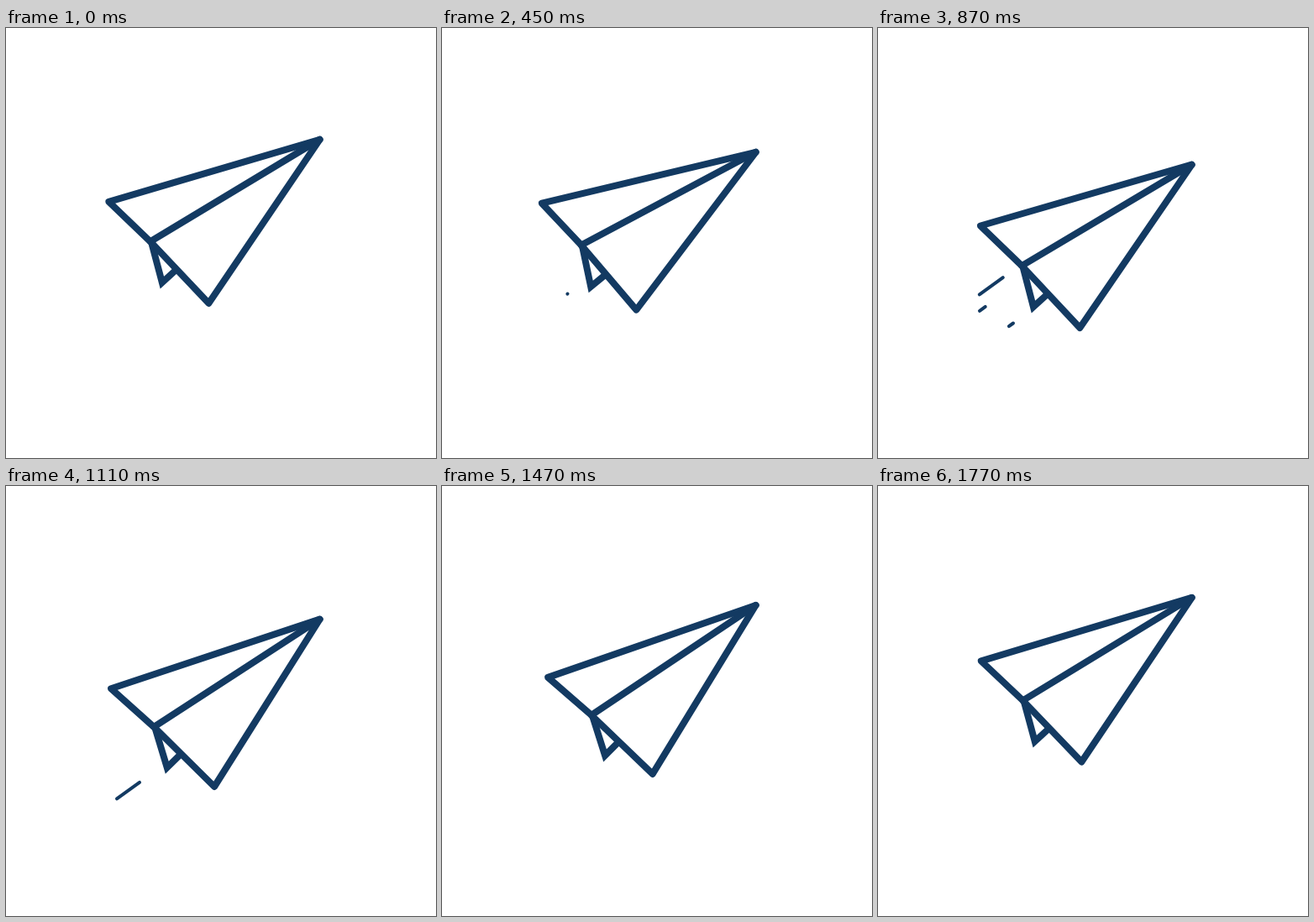
An HTML page with a canvas that plays this animation: 512x512 px, repeating every 1.8 s.

```html
<!DOCTYPE html>
<html lang="en">
<head>
<meta charset="utf-8">
<title>Paper plane</title>
<style>
  html, body { margin: 0; width: 100%; height: 100%; overflow: hidden; background: #fff; }
  canvas { display: block; width: 512px; height: 512px; }
</style>
</head>
<body>
<canvas id="stage"></canvas>
<script>
const SIZE = 512, LOOP = 1800, STEP = 30;
const canvas = document.getElementById('stage');
const ctx = canvas.getContext('2d');
const ratio = window.devicePixelRatio || 1;
canvas.width = canvas.height = SIZE * ratio;

// Plane corners relative to the nose, which is the pivot.
const NOSE = [0, 0], WING = [-251, 74.8], KEEL = [-131.7, 195.3], FOLD = [-201.4, 122];
const FLAP = [[-199.6, 125], [-187.3, 170.8], [-170.6, 155.5]];

// Wind streaks: start point, end point, start time.
const STREAKS = [
  { from: [149.5, 316.5], to: [121, 336.8], at: 440 },
  { from: [149.3, 296.7], to: [120.8, 317.3], at: 585 },
  { from: [161, 351.5], to: [132, 372.3], at: 806 }
];
const GROW = 240, TRAIL = 266;

const smooth = p => {
  p = Math.min(1, Math.max(0, p));
  return p * p * (3 - 2 * p);
};
const mix = (a, b, p) => [a[0] + (b[0] - a[0]) * p, a[1] + (b[1] - a[1]) * p];

// Eased swing from 1 to -1 and back over one loop.
function swing(t) {
  const p = ((t + LOOP) % LOOP) / LOOP;
  return 1 - 2 * smooth(1 - Math.abs(1 - 2 * p));
}

function stroke(points, width, join, closed) {
  ctx.lineWidth = width;
  ctx.lineJoin = join;
  ctx.beginPath();
  points.forEach(p => ctx.lineTo(p[0], p[1]));
  if (closed) ctx.closePath();
  ctx.stroke();
}

function drawPlane(t) {
  ctx.save();
  ctx.translate(373.6, 147.8 - 15 * swing(t));
  ctx.rotate((0.15 + 3 * swing(t - LOOP / 4)) * Math.PI / 180);
  stroke(FLAP, 8, 'miter');
  stroke([NOSE, WING, FOLD, KEEL], 8, 'round', true);
  stroke([NOSE, FOLD], 8, 'round');
  ctx.restore();
}

function drawStreak({ from, to, at }, t) {
  const head = smooth((t - at) / GROW);
  const tail = smooth((t - at - TRAIL) / GROW);
  if (head > tail) stroke([mix(from, to, tail), mix(from, to, head)], 4, 'round');
}

function draw(t) {
  ctx.setTransform(ratio, 0, 0, ratio, 0, 0);
  ctx.fillStyle = '#fff';
  ctx.fillRect(0, 0, SIZE, SIZE);
  ctx.strokeStyle = '#133a62';
  ctx.lineCap = 'round';
  drawPlane(t);
  STREAKS.forEach(s => drawStreak(s, t));
}

const begin = performance.now();
function tick() {
  const t = (performance.now() - begin) % LOOP;
  draw(Math.floor(t / STEP) * STEP);
  requestAnimationFrame(tick);
}
tick();
</script>
</body>
</html>
```
